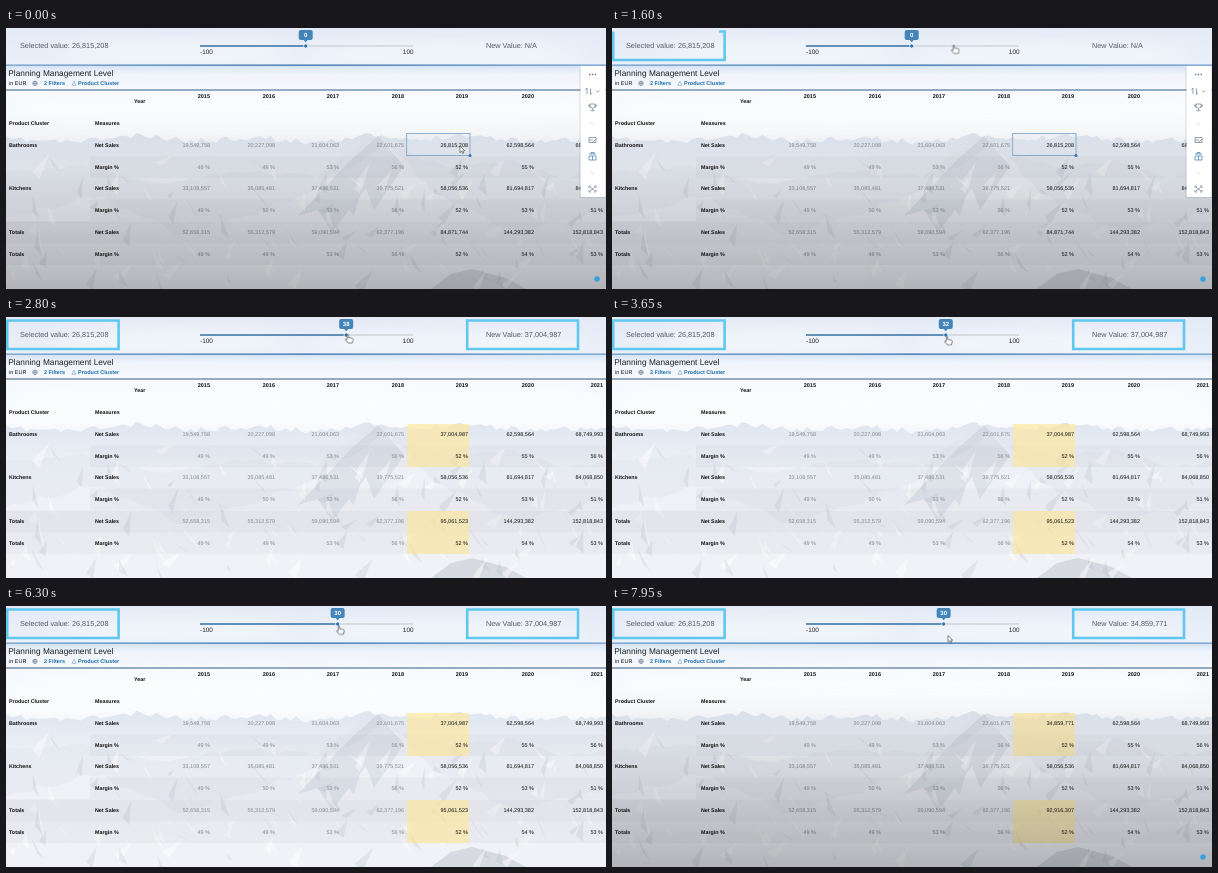
An HTML page for the animation above (8000 ms loop, 600 by 261 pixels).

```html
<!DOCTYPE html>
<html lang="en">
<head>
<meta charset="utf-8">
<title>Planning slider</title>
<style>
html, body { margin: 0; width: 100%; height: 100%; overflow: hidden; background: #eef2f8; }
svg { display: block; width: 100vw; height: 100vh; }
text { font-family: "Liberation Sans", Arial, sans-serif; font-size: 5.5px; fill: #111; text-rendering: geometricPrecision; }
.b { font-weight: bold; }
.label { font-size: 5.35px; }
.past { fill: #85888f; }
.link { fill: #1f6fae; font-weight: bold; }
.title { font-size: 8.3px; fill: #1c1f24; }
.value { font-size: 7.3px; fill: #555b66; }
.scale { font-size: 6.4px; fill: #222; }
.r { text-anchor: end; }
.icon { fill: none; stroke: #6b7a8a; stroke-width: .7; }
.frame { fill: none; stroke: #60c8ee; stroke-width: 2.6; stroke-dasharray: 100 200; stroke-dashoffset: 101; }

.frame, .anim { animation: 8s linear infinite; }
#leftFrame { animation-name: drawLeft; }
#rightFrame { animation-name: drawRight; }
#shade { animation-name: shade; }
#badge { animation-name: badge; }
.focus { animation-name: focus; animation-timing-function: step-end; }
#marks { animation-name: marks; animation-timing-function: step-end; }
#cursor { animation-name: move; }
#arrow { animation-name: arrow; animation-timing-function: step-end; }
#hand { animation-name: hand; animation-timing-function: step-end; }

@keyframes drawLeft { 0%, 17.2% { stroke-dashoffset: 101 } 21.7%, 100% { stroke-dashoffset: 0 } }
@keyframes drawRight { 0%, 29.5% { stroke-dashoffset: 101 } 34%, 100% { stroke-dashoffset: 0 } }
@keyframes shade { 0%, 20% { opacity: 1 } 21.25% { opacity: .12 } 21.875%, 81.875% { opacity: 0 } 83.125% { opacity: .85 } 83.75%, 100% { opacity: 1 } }
@keyframes badge { 0%, 20% { transform: translateY(0) } 21.25% { transform: translateY(7px) } 21.875%, 81.875% { transform: translateY(16px) } 83.125% { transform: translateY(7px) } 83.75%, 100% { transform: translateY(0) } }
@keyframes focus { 0% { opacity: 1 } 20.625%, 100% { opacity: 0 } }
@keyframes marks { 0% { opacity: 0 } 26.25%, 100% { opacity: 1 } }
@keyframes move {
  0%, 2% { transform: translate(454px, 118px); animation-timing-function: ease-in-out }
  16.5%, 20% { transform: translate(341.7px, 16.5px) }
  21.25%, 37.5% { transform: translate(341.7px, 17px); animation-timing-function: ease-in-out }
  49.75%, 91% { transform: translate(332.9px, 19.3px); animation-timing-function: ease-in-out }
  96.5%, 100% { transform: translate(336px, 29.5px) }
}
@keyframes arrow { 0% { opacity: 1 } 15% { opacity: 0 } 94%, 100% { opacity: 1 } }
@keyframes hand { 0% { opacity: 0 } 15% { opacity: 1 } 94%, 100% { opacity: 0 } }
</style>
</head>
<body>
<svg viewBox="0 0 600 261" preserveAspectRatio="none">
  <defs>
    <linearGradient id="sky" x2="0" y2="1">
      <stop offset="0" stop-color="#e3eaf6"/>
      <stop offset=".13" stop-color="#eaf0f9"/>
      <stop offset=".24" stop-color="#f6f9fd"/>
      <stop offset=".4" stop-color="#f9fbfd"/>
      <stop offset=".5" stop-color="#eff2f8"/>
      <stop offset="1" stop-color="#eff1f6"/>
    </linearGradient>
    <linearGradient id="far" x2="0" y2="1">
      <stop offset="0" stop-color="#dfe6f0"/>
      <stop offset=".3" stop-color="#eef1f7"/>
    </linearGradient>
    <linearGradient id="near" x2="0" y2="1">
      <stop offset="0" stop-color="#e1e5ed"/>
      <stop offset="1" stop-color="#eceef4"/>
    </linearGradient>
    <linearGradient id="rule">
      <stop offset="0" stop-color="#6d9bcb"/>
      <stop offset=".5" stop-color="#2d6cab"/>
      <stop offset="1" stop-color="#6d9bcb"/>
    </linearGradient>
    <linearGradient id="glow" x2="0" y2="1">
      <stop offset="0" stop-color="#bcd4ee" stop-opacity=".5"/>
      <stop offset="1" stop-color="#dce8f5" stop-opacity="0"/>
    </linearGradient>
    <linearGradient id="dark" x2="0" y2="1">
      <stop offset=".3" stop-color="#15171c" stop-opacity="0"/>
      <stop offset=".55" stop-color="#15171c" stop-opacity=".06"/>
      <stop offset=".78" stop-color="#15171c" stop-opacity=".16"/>
      <stop offset="1" stop-color="#15171c" stop-opacity=".28"/>
    </linearGradient>
    <filter id="soft" x="-50%" y="-150%" width="200%" height="400%"><feGaussianBlur stdDeviation="9"/></filter>
  </defs>

  <rect width="600" height="261" fill="url(#sky)"/>
  <g fill="#fff" opacity=".6" filter="url(#soft)">
    <ellipse cx="170" cy="22" rx="120" ry="8"/>
    <ellipse cx="440" cy="24" rx="140" ry="8"/>
    <ellipse cx="300" cy="84" rx="290" ry="14"/>
  </g>
  <g id="mountains"></g>

  <rect y="38" width="600" height="9" fill="url(#glow)"/>
  <rect y="36.5" width="600" height="1.3" fill="url(#rule)"/>
  <g fill="#8c8f98">
    <path d="M84 128.5H600v21.5H84zM84 171.5H600v21.5H84z" opacity=".07"/>
    <path d="M0 193.5H600v22H0z" opacity=".12"/>
    <path d="M0 215.5H600v21.5H0z" opacity=".07"/>
  </g>
  <path d="M0 62H600" stroke="#1f4a75" stroke-width=".9"/>
  <path id="marks" class="anim" fill="#fde79a" fill-opacity=".65" d="M401 107h62v43h-62zM401 194h62v43h-62z"/>
  <rect class="anim focus" x="400.7" y="105.5" width="63.3" height="22" fill="#e4edf7" fill-opacity=".3" stroke="#7ba3c8" stroke-width=".8"/>

  <text class="title" x="2.3" y="48">Planning Management Level</text>
  <text x="3" y="57.3">in EUR</text>
  <g class="icon" stroke="#444" stroke-width=".6">
    <circle cx="29" cy="55.3" r="2.2"/>
    <path d="M26.8 55.3h4.4M29 53.1v4.4"/>
    <path d="M66 57.3l2-4 2 4z" stroke="#8aa9c4"/>
  </g>
  <text class="link" x="38" y="57.3">2 Filters</text>
  <text class="link" x="72" y="57.3">Product Cluster</text>
  <text class="b label" x="128" y="75">Year</text>
  <g id="table"></g>

  <text class="value" x="14" y="20.2">Selected value: 26,815,208</text>
  <text class="value" x="480" y="20.2" id="newValue"></text>
  <path id="leftFrame" class="frame" pathLength="100" d="M1.2 3.5V32H112.6V3.5Z"/>
  <path id="rightFrame" class="frame" pathLength="100" d="M461.2 3.5V32H572V3.5Z"/>

  <path d="M194 18H407" stroke="#cfd4db" stroke-width="1.3"/>
  <path id="fill" stroke="#3a76ab" stroke-width="1.7"/>
  <text class="scale" x="194" y="26">-100</text>
  <text class="scale r" x="407.5" y="26">100</text>
  <g id="knob">
    <circle cy="18" r="2.1" fill="#2d72b0" stroke="#fff" stroke-width=".7"/>
    <path d="M-5 2H5Q7 2 7 4V10Q7 12 5 12H2L0 14.3L-2 12H-5Q-7 12-7 10V4Q-7 2-5 2Z" fill="#4384b9"/>
    <text id="tip" class="b" y="9.2" text-anchor="middle" style="fill:#fff;font-size:6px"></text>
  </g>

  <rect id="shade" class="anim" width="600" height="261" fill="url(#dark)"/>
  <circle id="badge" class="anim" cx="591" cy="251" r="2.8" fill="#36a3df"/>

  <g class="anim focus">
    <circle cx="464" cy="127.5" r="1.5" fill="#2d72b0"/>
    <rect x="573.5" y="38.8" width="26.5" height="131.4" rx="2" fill="#57606c" opacity=".18"/>
    <rect x="574.5" y="38" width="25" height="131" rx="1.5" fill="#fff"/>
    <g class="icon">
      <path d="M583 46.5h7" stroke-width="1.3" stroke-dasharray="1.4 1.4"/>
      <path d="M581 66v-6l-1.5 1.8M584.5 60.5v6l1.5-1.8M590 62.5l1.7 1.7 1.7-1.7"/>
      <path d="M584 76h5v3q-2.5 3-5 0zM584 77h-1.5q0 2 2 2.5M589 77h1.5q0 2-2 2.5M586.5 80.5v2M584.5 82.7h4"/>
      <path d="M584.5 94.5l4 3M584.5 143.5l4 3" opacity=".35"/>
      <path d="M583 109.5h7v5h-7zM583 112h4M586 115l4-4"/>
      <path d="M583 126h7M583 128v4h7v-4zM585 126v-1.5h3v1.5M586.5 128v4" stroke="#397cae"/>
      <path d="M583 160v-2h2M588 158h2v2M590 162v2h-2M585 164h-2v-2M584 159l5 4M589 159l-5 4"/>
    </g>
  </g>

  <g id="cursor" class="anim" stroke="#333" stroke-width=".6" stroke-linejoin="round" fill="#fff">
    <path id="arrow" class="anim" d="M0 0V6.6L1.6 5.2 2.6 7.5 3.7 7 2.7 4.8H4.8Z"/>
    <path id="hand" class="anim" d="M-.7 5.6V.8Q0-.4.7.8V3.6L4.6 4.3Q5.4 4.6 5.3 5.6L4.5 9H.4L-2.4 5.8Q-2.2 4.6-.7 5.6Z"/>
  </g>
</svg>
<script>
const LOOP = 8000;
const SELECTED = 26815208;
const TOTAL = 84871744;
const byId = id => document.getElementById(id);
const money = n => n.toLocaleString('en-US');

function add(parent, tag, attrs, content = '') {
  const el = document.createElementNS('http://www.w3.org/2000/svg', tag);
  for (const key in attrs) el.setAttribute(key, attrs[key]);
  el.textContent = content;
  return parent.appendChild(el);
}

let seed = 11;
const random = () => (seed = seed * 16807 % 2147483647) / 2147483647;
const mountain = attrs => add(byId('mountains'), 'path', attrs);

// Rough skyline: straight runs between the given points with small random teeth.
function ridge(points, step, rough, attrs) {
  let d = 'M0 261';
  points.slice(1).forEach(([x2, y2], i) => {
    const [x1, y1] = points[i];
    for (let x = x1; x < x2; x += step) {
      const y = y1 + (y2 - y1) * (x - x1) / (x2 - x1);
      d += `L${x} ${(y + (random() - .5) * rough).toFixed(1)}`;
    }
  });
  mountain({ d: d + `L600 ${points.at(-1)[1]}V261Z`, ...attrs });
}

ridge([[0, 111], [60, 114], [130, 108], [190, 113], [245, 109], [300, 114], [360, 108], [410, 113], [450, 106], [520, 113], [600, 111]],
  5, 6, { fill: 'url(#far)' });
ridge([[0, 146], [70, 137], [150, 156], [240, 143], [310, 148], [368, 107], [400, 122], [440, 140], [500, 133], [560, 150], [600, 145]],
  7, 5, { fill: 'url(#near)', opacity: .7 });
ridge([[0, 190], [90, 168], [170, 205], [260, 182], [330, 150], [380, 116], [430, 165], [510, 205], [600, 185]],
  8, 7, { fill: '#f4f5f9', opacity: .6 });

// Shaded faces of the main peak and the rocks at the lower edge.
mountain({ d: 'M372 108L345 132L292 188L312 182L326 204L360 160L368 182L398 138Z', fill: '#9da6b8', opacity: .2 });
mountain({ d: 'M425 261L445 246L466 241L500 250L520 261Z', fill: '#8b919d', opacity: .25 });

// Snow streaks running down the slopes.
for (let i = 0; i < 130; i++) {
  const x = random() * 600, y = 124 + random() * 125;
  const w = (random() - .4) * 34, h = 8 + random() * 20;
  mountain({
    d: `M${x} ${y}l${w} ${h}l${-3 - random() * 6} ${-h * .3}Z`,
    fill: i % 2 ? '#fff' : '#a3adbf',
    opacity: i % 2 ? .45 : .2
  });
}

const right = [204, 269, 333, 398, 462, 528, 597];
const rows = [
  ['Bathrooms', 119, '19,549,758 20,227,098 21,604,063 22,601,675 26,815,208 62,598,564 68,749,993', '49 49 53 56 52 55 56'],
  ['Kitchens', 162.3, '33,108,557 35,085,481 37,486,531 39,775,521 58,056,536 81,694,817 84,068,850', '49 50 53 56 52 53 51'],
  ['Totals', 206, '52,658,315 55,312,579 59,090,594 62,377,196 84,871,744 144,293,382 152,818,843', '49 49 53 56 52 54 53']
];
const table = byId('table');
const label = (x, y, s) => add(table, 'text', { class: 'b label', x, y }, s);
const cells = (y, list) => list.map((s, i) =>
  add(table, 'text', { class: i < 4 ? 'r past' : 'r', x: right[i], y }, s));

right.forEach((x, i) => add(table, 'text', { class: 'b r', x, y: 70 }, 2015 + i));
label(3, 97, 'Product Cluster');
label(89, 97, 'Measures');
const sales = rows.map(([name, y, amounts, margins]) => {
  label(3, y, name);
  label(89, y, 'Net Sales');
  label(89, y + 21.8, 'Margin %');
  cells(y + 21.8, margins.split(' ').map(m => m + ' %'));
  return cells(y, amounts.split(' '));
});
label(3, 227.8, 'Totals');

function sliderAt(t) {
  if (t < 1650) return 0;
  const p = Math.min(1, Math.max(0, (t - 3000) / 980));
  return Math.round(38 - 8 * p * p * (3 - 2 * p));
}

const plannedAt = t => t < 2100 ? null : t < 7200 ? 37004987 : 34859771;

function render(t) {
  const v = sliderAt(t);
  const x = 299.7 + v * 1.065;
  byId('knob').setAttribute('transform', `translate(${x} 0)`);
  byId('fill').setAttribute('d', `M194 18H${x}`);
  byId('tip').textContent = v;

  const planned = plannedAt(t);
  const amount = planned ?? SELECTED;
  byId('newValue').textContent = 'New Value: ' + (planned ? money(planned) : 'N/A');
  sales[0][4].textContent = money(amount);
  sales[2][4].textContent = money(TOTAL + amount - SELECTED);
}

let start;
function tick(now) {
  start ??= now;
  render((now - start) % LOOP);
  requestAnimationFrame(tick);
}
render(0);
requestAnimationFrame(tick);
</script>
</body>
</html>
```
